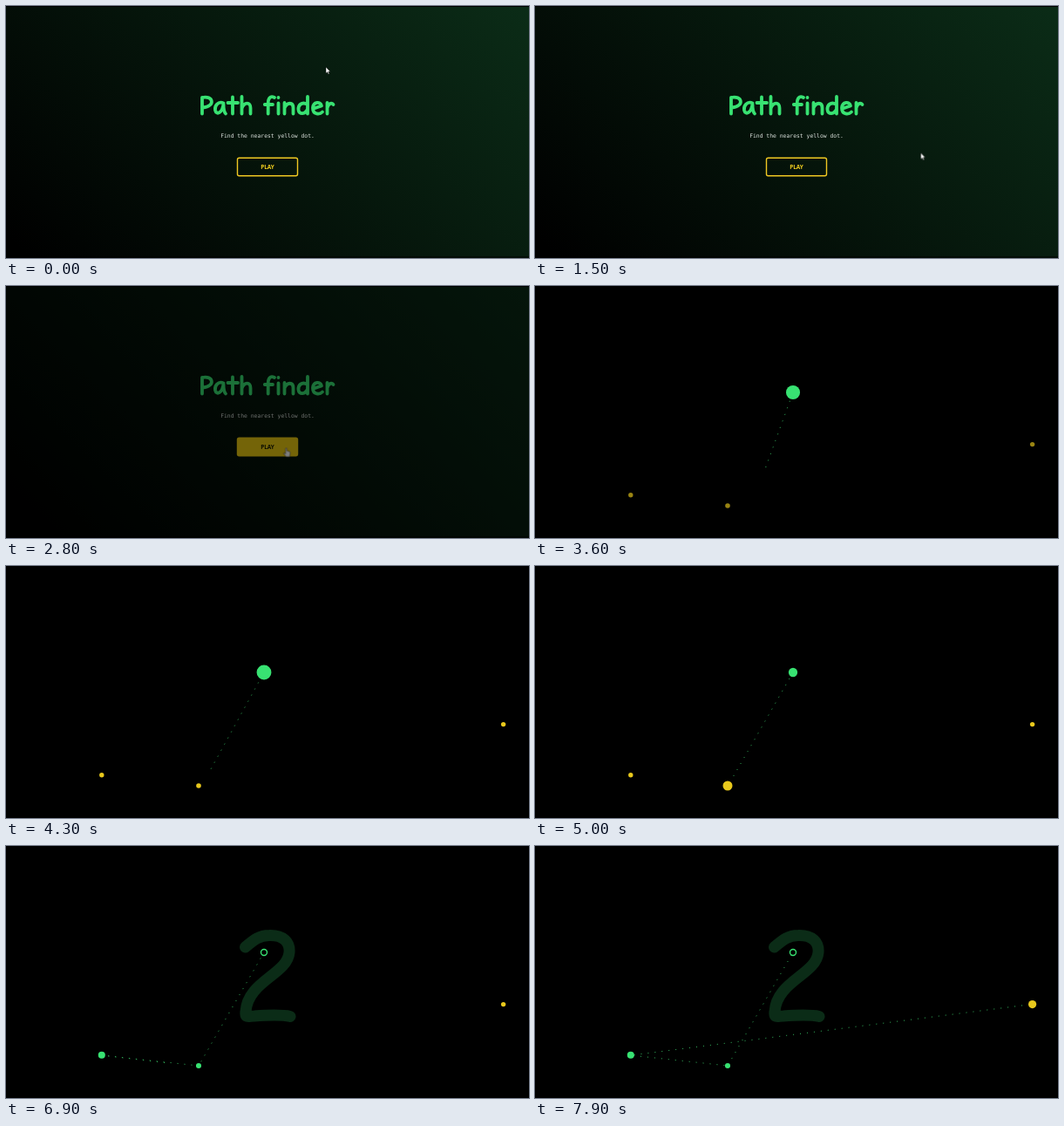
An HTML page for the animation above (8000 ms loop, 600 by 289 pixels).

```html
<!DOCTYPE html>
<html lang="en">
<head>
<meta charset="utf-8">
<title>Path finder</title>
<style>
  html, body { margin: 0; height: 100%; overflow: hidden; background: #000; }
  svg { display: block; width: 100vw; height: 100vh; }
  :root { --green: #38e272; --yellow: #e8c81c; --deep: #0b2c17; }

  .loop { animation: 8s linear infinite; }

  /* Menu */
  .menu { animation-name: leave; }
  .lettering { fill: none; stroke: var(--green); stroke-width: 3.8; stroke-linecap: round; stroke-linejoin: round; }
  .hint { font: 6.4px "DejaVu Sans Mono", monospace; fill: #dfe4e0; }
  .button { animation-name: press; fill: #ebca1200; stroke: #f0c822; stroke-width: 1.4; }
  .label { animation-name: ink; font: bold 6.4px "Open Sans", sans-serif; fill: #f3d01f; }
  .pointer { animation-name: travel; fill: #fff; stroke: #000; stroke-width: .4; }
  .arrow { animation-name: arrow; }
  .hand { animation-name: hand; }

  @keyframes leave { 0%, 32.5% { opacity: 1 } 37.5%, 100% { opacity: 0 } }
  @keyframes press {
    0%, 25% { fill: #ebca1200; stroke: #f0c822 }
    27%, 100% { fill: #ebca12; stroke: #ebca12 }
  }
  @keyframes ink { 0%, 25% { fill: #f3d01f } 27%, 100% { fill: #161a05 } }
  @keyframes arrow { 0%, 25.4% { opacity: 1 } 25.5%, 100% { opacity: 0 } }
  @keyframes hand { 0%, 25.4% { opacity: 0 } 25.5%, 100% { opacity: 1 } }
  @keyframes travel {
    0%, .6% { transform: translate(367px, 70px) }
    4% { transform: translate(430px, 95px) }
    9% { transform: translate(488px, 134px) }
    13% { transform: translate(494px, 148px) }
    17% { transform: translate(465px, 164px) }
    22.5% { transform: translate(395px, 178px) }
    26% { transform: translate(330px, 190px) }
    28.5%, 100% { transform: translate(321.5px, 185.5px) }
  }

  /* Trails */
  .trail { fill: none; stroke: #34b95f; stroke-width: 1; stroke-dasharray: 1 7; }
  .flow { animation: flow 2s linear infinite; }
  @keyframes flow { from { stroke-dashoffset: 4 } to { stroke-dashoffset: -4 } }
  .reach { animation: flow 2s linear infinite, reach 8s linear infinite; }
  @keyframes reach {
    0%, 38% { opacity: 0; d: path("M296 122 L318 187") }
    39.5% { opacity: 1; d: path("M296 122 L310 192") }
    45% { d: path("M296 122 L264 210") }
    52% { d: path("M296 122 L236 234") }
    57%, 62.5% { d: path("M296 122 L226 244") }
    65.6% { d: path("M296 122 L222 250") }
    65.7% { d: path("M221 252 L220 250") }
    67.5% { d: path("M221 252 L207 247") }
    72.5% { d: path("M221 252 L112 232") }
    75%, 79.9% { d: path("M221 252 L111 239") }
    80% { d: path("M110 240 L111 239") }
    83% { d: path("M110 240 L128 243") }
    86.25% { d: path("M110 240 L188 249.5") }
    90% { d: path("M110 240 L431 205") }
    94.4% { d: path("M110 240 L593 180") }
    97%, 100% { opacity: 1; d: path("M110 240 L566 182") }
  }

  /* Visibility */
  .at65 { animation-name: from65; }
  .at80 { animation-name: from80; }
  .disc { animation-name: disc; }
  @keyframes from65 { 0%, 65.6% { opacity: 0 } 65.7%, 100% { opacity: 1 } }
  @keyframes from80 { 0%, 79.9% { opacity: 0 } 80%, 100% { opacity: 1 } }
  @keyframes disc { 0%, 36% { opacity: 0 } 40%, 65.6% { opacity: 1 } 65.7%, 100% { opacity: 0 } }

  /* Dots */
  .green { fill: var(--green); }
  .dot { fill: var(--yellow); }
  .pulse { animation: pulse .5s ease-in-out infinite alternate; }
  @keyframes pulse { from { r: var(--low) } to { r: var(--high) } }
  .near { animation-name: fade, near; }
  .left { animation-name: fade, left; }
  .right { animation-name: fade, right; }
  @keyframes fade { 0%, 37% { opacity: 0 } 45% { opacity: .66 } 50%, 100% { opacity: 1 } }
  @keyframes near {
    0%, 57.5% { r: 2.8px } 62.5% { r: 5.5px } 65.6% { r: 7px } 65.7%, 100% { r: 0 }
  }
  @keyframes left {
    0%, 73.5% { r: 2.7px } 78%, 79.9% { r: 5.7px } 80%, 100% { r: 0 }
  }
  @keyframes right { 0%, 96% { r: 2.7px } 98.75%, 100% { r: 4.6px } }

  /* Score */
  .score { fill: none; stroke: var(--deep); stroke-width: 13; stroke-linecap: round; stroke-linejoin: round; }
  .one { animation-name: one; }
  @keyframes one { 0%, 65.6% { opacity: 0 } 67.5%, 79.9% { opacity: 1 } 80%, 100% { opacity: 0 } }
</style>
</head>
<body>
<svg viewBox="0 0 600 289" preserveAspectRatio="none">
  <defs>
    <linearGradient id="dusk" gradientUnits="userSpaceOnUse" x1="77.75" y1="366.75" x2="522.25" y2="-77.75">
      <stop offset=".03" stop-color="#000"/>
      <stop offset="1" stop-color="#0b2c17"/>
    </linearGradient>
  </defs>

  <g class="score">
    <path class="loop one" d="M286 117Q298 111 306 101C306 130 301 160 302.5 194M285.5 195.5H317.5"/>
    <path class="loop at80" d="M274.5 116C284 108 290 102.5 302 102.5C318 102 326 110 325 122C323 147 277 155 275 190C274 198 278 195 285 195C300 194 315 193 326 195.5"/>
  </g>

  <g class="trail">
    <g class="loop at65"><path class="flow" d="M296 122L221 252"/></g>
    <g class="loop at80"><path class="flow" d="M221 252L110 240"/></g>
    <path class="reach" d="M296 122L264 210"/>
  </g>

  <circle class="loop dot near" cx="221" cy="252" r="2.8"/>
  <circle class="loop dot left" cx="109.8" cy="239.8" r="2.7"/>
  <circle class="loop dot right" cx="570.6" cy="181.6" r="2.7"/>

  <g class="green">
    <g class="loop disc">
      <circle class="pulse" cx="296" cy="122" r="5" style="--low:5px;--high:9px;animation-delay:-67ms"/>
    </g>
    <circle class="loop at65" cx="296" cy="122" r="3.5" fill="#000" stroke="#38e272" stroke-width="1.4"/>
    <g class="loop at65">
      <circle class="pulse" cx="221" cy="252" r="3" style="--low:3px;--high:6px;animation-delay:-150ms"/>
    </g>
    <g class="loop at80">
      <circle class="pulse" cx="109.8" cy="239.8" r="4" style="--low:4px;--high:6px;animation-delay:-150ms"/>
    </g>
  </g>

  <g class="loop menu">
    <rect width="600" height="289" fill="url(#dusk)"/>
    <path d="M0 .5H600M0 288H600" stroke="#000"/>
    <text x="300" y="125" font-size="28" font-family="DejaVu Sans, sans-serif" text-anchor="middle" fill="none">Path finder</text>
    <g class="lettering" aria-hidden="true">
      <path d="M225 105V123.5M225 105C237.5 102 241 115 226 116.5"/>
      <path d="M249.5 111.5C243.5 108.5 239 115 240 119.5C241.5 125.5 248 123 249.5 112.5C249.5 119 250.5 122 252 123.5"/>
      <path d="M260 104.5V123.5M254.5 111H266"/>
      <path d="M270.5 104V123.5M270.5 117.5C273.5 109.5 280.5 110 280.5 117V123.5"/>
      <path d="M308 105C303 102.5 300.7 106 300.7 112V123.5M296.8 113H306"/>
      <path d="M312.5 105V105.1M312.5 111.5V123.5"/>
      <path d="M319.5 111V123.5M319.5 117C322.500 110 329.5 110 329.5 117V123.5"/>
      <path d="M346 104V123.5M346 113C339 109 335 114 335.5 119C336 125 343.5 124.5 346 118"/>
      <path d="M352.5 117.8L362 114.5C361 109 352.5 109.5 352 117C352 125 360 124.5 363 121.5"/>
      <path d="M368.5 111V123.5M368.5 117C370 111.500 373.5 110.5 375.5 113"/>
    </g>
    <text class="hint" x="300" y="150.5" text-anchor="middle">Find the nearest yellow dot.</text>
    <rect class="loop button" x="265.5" y="174.2" width="69" height="20.6" rx="2"/>
    <text class="loop label" x="300" y="186.5" text-anchor="middle">PLAY</text>
    <g class="loop pointer">
      <path class="loop arrow" d="M0 0V7.2L1.7 5.7 2.8 8.2 3.9 7.7 2.8 5.3H5Z"/>
      <path class="loop hand" d="M-.8 .7Q0 -.5 .8 .7V3.6L4 4.4Q4.8 4.8 4.6 6L4 10.3H-.2L-3 6.6Q-3 5.6 -1.9 6L-.8 7Z"/>
    </g>
  </g>
</svg>
</body>
</html>
```
